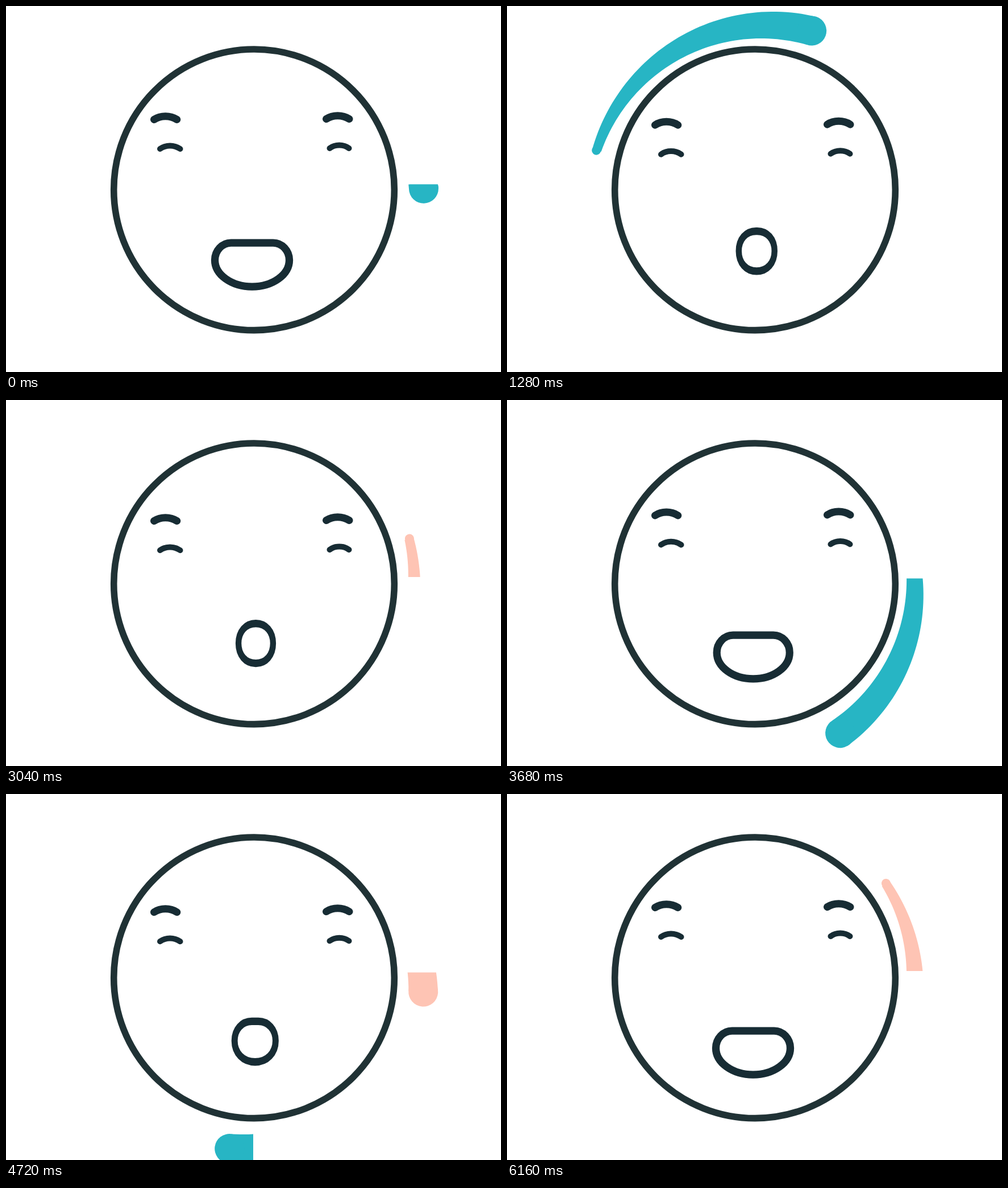
An HTML page for the animation above (6240 ms loop, 871 by 643 pixels).

```html
<!DOCTYPE html>
<html lang="en">
<head>
<meta charset="utf-8">
<title>Breathing face</title>
<style>
  html, body { margin: 0; width: 100%; height: 100%; overflow: hidden; background: #fff; }
  svg { display: block; width: 871px; height: 643px; }
  .line { fill: none; stroke: #172c34; stroke-linecap: round; stroke-linejoin: round; }
</style>
</head>
<body>
<svg viewBox="0 0 871 643">
  <defs>
    <clipPath id="enter"><path d="M0 313.5H871V643H0Z"/></clipPath>
    <clipPath id="leave"><path d="M0 0H871V311H435V643H0Z"/></clipPath>
    <g id="swoosh">
      <path id="body"/>
      <circle cx="300" r="26"/>
      <circle id="tail" r="8"/>
    </g>
  </defs>

  <g id="teal" fill="#27b5c4"><use href="#swoosh"/></g>
  <g id="pink" fill="#fec4b4"><use href="#swoosh"/></g>

  <circle cx="436.5" cy="322.8" r="246.8" fill="none" stroke="#203235" stroke-width="11.6"/>
  <g id="eyes" class="line">
    <path stroke-width="13" d="M260.5 199.5C272 191.8 289 191.8 300.8 199.5M563.5 198.5C575 190.8 592 190.8 604 198.5"/>
    <path stroke-width="10" d="M271 251C281 243.5 296 243.5 306.5 251M569.5 250C579 242.7 594 242.7 603.5 250"/>
  </g>
  <path id="mouth" class="line" stroke-width="13.3"/>
</svg>

<script>
const LOOP = 6240, STEP = 80;
const TICK = 1000 / 30, TURN = 95, PINK_START = 45;   // the swooshes move in ticks
const BREATH = 2080, HALF = 960;
const SPAN = 95.1, CX = 435, CY = 326;

const $ = id => document.getElementById(id);
const rad = deg => deg * Math.PI / 180;
const mix = (a, b, k) => a + (b - a) * k;
const smooth = x => x * x * (3 - 2 * x);
const smoother = x => x * x * x * (x * (6 * x - 15) + 10);

// Head angle in degrees, clockwise from the right: steady acceleration with one kick.
const headAngle = n => -1 + 2.325 * n + 0.115 * n * n + 6.6 * Math.max(0, n - 32.5);

// The swoosh lies between two off-centre arcs, its head at angle 0.
function buildSwoosh() {
  const outer = a => 329 - 35 * Math.cos(rad(a - 85));
  const inner = a => 295.6 - 29 * Math.cos(rad(a - 42));
  const point = (r, a) => [r * Math.cos(rad(a)), -r * Math.sin(rad(a))];
  const far = [], near = [];
  for (let i = 0; i <= 60; i++) {
    const a = SPAN * i / 60;
    far.push(point(outer(a), a));
    near.unshift(point(inner(a), a));
  }
  $('body').setAttribute('d', 'M' + far.concat(near).join('L') + 'Z');
  const [x, y] = point(287, SPAN);
  $('tail').setAttribute('cx', x);
  $('tail').setAttribute('cy', y);
}

function drawSwoosh(id, n) {
  const angle = headAngle(n), group = $(id);
  const visible = n >= 0 && angle < 360 + SPAN + 5;
  group.style.display = visible ? '' : 'none';
  const clip = angle < SPAN + 5 ? 'url(#enter)' : angle > 270 ? 'url(#leave)' : 'none';
  group.setAttribute('clip-path', clip);
  group.firstElementChild.setAttribute('transform', `translate(${CX} ${CY}) rotate(${angle})`);
}

// Mouth: flat top edge, widest at height "side", built from four elliptic quarters.
const smile = { flat: 37, wide: 65.5, high: 38.5, side: -8, bend: 0.55, x: 433, scale: 1 };
const round = { flat: 0, wide: 39, high: 35, side: 0, bend: 0.59, x: 439.5, scale: 0.78 };

function mouthPath({ flat, wide, high, side, bend }) {
  const top = mix(side, -high, bend), low = mix(side, high, bend);
  const corner = mix(flat, wide, bend), chin = wide * bend;
  return `M${flat} ${-high}C${corner} ${-high} ${wide} ${top} ${wide} ${side}` +
    `C${wide} ${low} ${chin} ${high} 0 ${high}` +
    `C${-chin} ${high} ${-wide} ${low} ${-wide} ${side}` +
    `C${-wide} ${top} ${-corner} ${-high} ${-flat} ${-high}Z`;
}

function drawFace(t) {
  const v = smooth(Math.max(0, 1 - Math.abs(t / HALF - 1)));
  const lift = smoother(v), shape = smooth(lift);
  $('eyes').setAttribute('transform', `translate(0 ${13 * v})`);

  const now = {};
  for (const key in smile) now[key] = mix(smile[key], round[key], shape);
  $('mouth').setAttribute('d', mouthPath(now));
  $('mouth').setAttribute('transform',
    `translate(${now.x} ${mix(454.6, 427.6, lift)}) scale(${now.scale} 1)`);
}

function draw(ms) {
  const t = Math.floor((ms % LOOP) / STEP) * STEP;
  const n = Math.round(t / TICK) % TURN;
  drawSwoosh('teal', n);
  drawSwoosh('pink', n - PINK_START);
  drawFace(t % BREATH);
}

buildSwoosh();
const begin = performance.now();
(function frame() {
  draw(performance.now() - begin);
  requestAnimationFrame(frame);
})();
</script>
</body>
</html>
```
